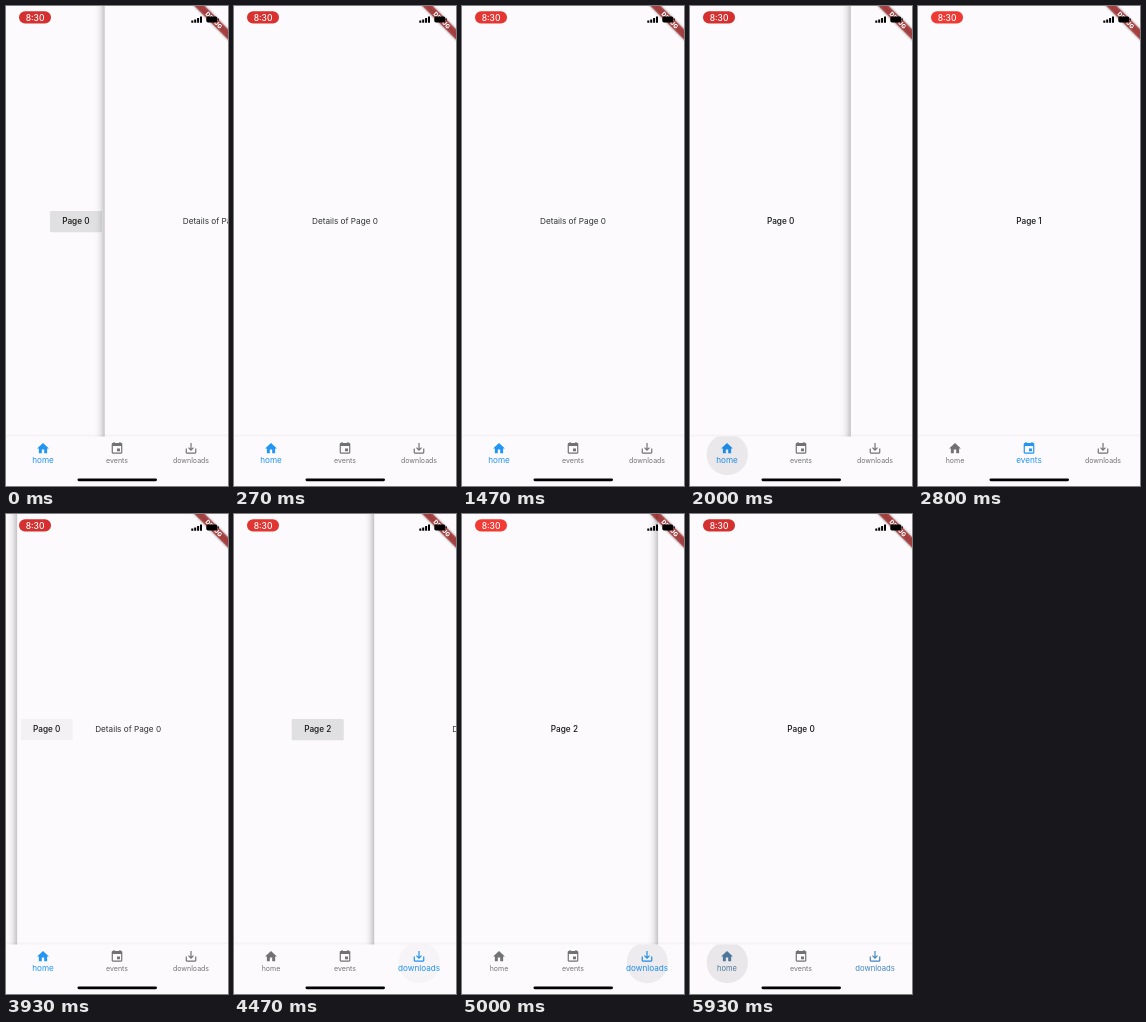
These frames come from a looping animation (222 by 480 pixels, 5990 ms). An HTML page:

```html
<!DOCTYPE html>
<html lang="en">
<head>
<meta charset="utf-8">
<title>Tab navigation</title>
<style>
html, body { margin: 0; width: 100%; height: 100%; overflow: hidden; background: #fcfafd; }
svg { display: block; width: 100%; height: 100%; }
text { font-family: Inter, Roboto, sans-serif; text-anchor: middle; }
.page { font-size: 8.25px; font-weight: 500; fill: #161616; }
.details { font-size: 8.2px; fill: #303030; }
.label { font-size: 7px; }
</style>
</head>
<body>
<svg viewBox="0 0 222 480">
  <defs>
    <linearGradient id="edge">
      <stop offset="0" stop-opacity="0"/>
      <stop offset=".3" stop-opacity=".016"/>
      <stop offset=".6" stop-opacity=".07"/>
      <stop offset="1" stop-opacity=".22"/>
    </linearGradient>
    <linearGradient id="lift" x2="0" y2="1">
      <stop offset="0" stop-opacity="0"/>
      <stop offset="1" stop-opacity=".045"/>
    </linearGradient>
    <clipPath id="barClip"><path d="M0 430.5h222V480H0z"/></clipPath>
    <filter id="blur" x="-20%" y="-100%" width="140%" height="300%"><feGaussianBlur stdDeviation="1.2"/></filter>
  </defs>
  <rect width="222" height="480" fill="#fcfafd"/>

  <g id="root">
    <rect id="press" x="85" y="205" width="52" height="21.3" rx="1.2"/>
    <text id="pageText" class="page" x="111" y="218.3"></text>
  </g>
  <g id="top">
    <rect x="-11" width="11" height="431" fill="url(#edge)"/>
    <text id="detailText" class="details" x="111" y="218.3"></text>
  </g>

  <rect y="427.5" width="222" height="3" fill="url(#lift)"/>
  <rect y="430.5" width="222" height="49.5" fill="#fcfafd"/>
  <g id="bar" clip-path="url(#barClip)"></g>
  <rect x="71.5" y="472.4" width="79.5" height="2.9" rx="1.45"/>

  <g transform="translate(207.8 14.2) rotate(45)">
    <rect x="-26" y="-3.6" width="52" height="7.2" opacity=".5" filter="url(#blur)"/>
    <rect x="-26" y="-3.6" width="52" height="7.2" fill="#b71c1c" fill-opacity=".63"/>
    <text y="2.1" font-size="6" font-weight="800" fill="#fff">DEBUG</text>
  </g>
  <path d="M185.3 14.6h2v2.2h-2zM188.2 13.4h2v3.4h-2zM191.1 12h2v4.8h-2zM194 10.4h2v6.4h-2z"/>
  <rect x="200.3" y="10.4" width="11" height="6" rx="1.7"/>
  <rect x="211.9" y="12.3" width=".9" height="2.2" rx=".4"/>
  <rect id="pill" x="13" y="5.2" width="32" height="12.3" rx="6.1"/>
  <text x="29" y="14.5" font-size="8.5" font-weight="500" fill="#fff">8:30</text>
</svg>
<script>
const LOOP = 5990, SLIDE = 330, W = 222;
const $ = id => document.getElementById(id);
const clamp = v => Math.max(0, Math.min(1, v));
const mix = (a, b, k) => a + (b - a) * k;
const blend = (a, b, k) => `rgb(${a.map((v, i) => Math.round(mix(v, b[i], k)))})`;
const GREY = [114, 114, 116], BLUE = [33, 150, 243];
const DARK_RED = [211, 48, 47], LIGHT_RED = [242, 59, 53];

function bezier(x1, y1, x2, y2) {
  const at = (a, b, s) => 3 * (1 - s) * (1 - s) * s * a + 3 * (1 - s) * s * s * b + s ** 3;
  return x => {
    if (x <= 0 || x >= 1) return clamp(x);
    let lo = 0, hi = 1;
    for (let i = 0; i < 24; i++) {
      const mid = (lo + hi) / 2;
      if (at(x1, x2, mid) < x) lo = mid; else hi = mid;
    }
    return at(y1, y2, lo);
  };
}
const slideEase = bezier(.35, .91, .33, .97);
const tabEase = bezier(.4, 0, .2, 1);

const tabs = [
  { name: 'home', x: 37, icon: 'M10 20v-6h4v6h5v-8h3L12 3 2 12h3v8z' },
  { name: 'events', x: 111, icon: 'M17 12h-5v5h5v-5zM16 1v2H8V1H6v2H5c-1.11 0-1.99.9-1.99 2L3 19c0 1.1.89 2 2 2h14c1.1 0 2-.9 2-2V5c0-1.1-.9-2-2-2h-1V1h-2zm3 18H5V8h14v11z' },
  { name: 'downloads', x: 185, icon: 'M19 12v7H5v-7H3v7c0 1.1.9 2 2 2h14c1.1 0 2-.9 2-2v-7h-2zm-6 .67l2.59-2.58L17 11.5l-5 5-5-5 1.41-1.41L11 12.67V3h2z' }
];

// Tapping the current tab pops its details page.
const taps = [
  { at: 1900, tab: 0 }, { at: 2400, tab: 1 }, { at: 3150, tab: 0 },
  { at: 4200, tab: 2 }, { at: 4855, tab: 2 }, { at: 5870, tab: 0 }
];
const pushes = [-72, 3743, 4420];

function add(parent, tag, attrs) {
  const el = document.createElementNS('http://www.w3.org/2000/svg', tag);
  for (const k in attrs) el.setAttribute(k, attrs[k]);
  return parent.appendChild(el);
}
const set = (el, k, v) => el.setAttribute(k, v);

for (const tab of tabs) {
  const g = tab.group = add($('bar'), 'g', {});
  add(g, 'path', { d: tab.icon, transform: `translate(${tab.x - 7.1} 435.3) scale(.592)` });
  tab.label = add(g, 'text', { class: 'label' });
  tab.label.textContent = tab.name;
  tab.ripple = add($('bar'), 'circle', { cx: tab.x + .3, cy: 448.5, r: 20.7 });
}

function stateAt(t) {
  let tab = 0, prev = 0, switched = -1e4, slide = null;
  const moves = [...taps, ...pushes.map(at => ({ at, push: true }))].sort((a, b) => a.at - b.at);
  for (const m of moves) {
    if (m.at > t) break;
    if (m.push) slide = { at: m.at, open: true };
    else if (m.tab === tab) slide = { at: m.at, open: false };
    else {
      prev = tab;
      tab = m.tab;
      switched = m.at;
      slide = null;
    }
  }
  const k = slide ? slideEase((t - slide.at) / SLIDE) : 0;
  return { tab, prev, switched, depth: slide && !slide.open ? 1 - k : k };
}

function pressAlpha(t) {
  let a = 0;
  for (const at of pushes) {
    const d = t - at;
    if (d > -120 && d < 240) a = .11 * clamp((d + 120) / 60) * clamp((240 - d) / 150);
  }
  return a;
}

function rippleAlpha(t, tab) {
  let a = 0;
  for (const tap of taps) {
    const d = t - tap.at;
    if (tap.tab === tab && d > 0) a = .075 * clamp(d / 20) * clamp((350 - d) / 270);
  }
  return a;
}

function draw(t) {
  const s = stateAt(t);
  const k = tabEase((t - s.switched) / 200);

  $('pageText').textContent = 'Page ' + s.tab;
  $('detailText').textContent = 'Details of Page ' + s.tab;
  set($('root'), 'transform', `translate(${-s.depth * W / 3} 0)`);
  set($('root'), 'visibility', s.depth < 1 ? 'visible' : 'hidden');
  set($('top'), 'transform', `translate(${(1 - s.depth) * W} 0)`);
  set($('top'), 'visibility', s.depth > 0 ? 'visible' : 'hidden');
  set($('press'), 'fill-opacity', pressAlpha(t));

  tabs.forEach((tab, i) => {
    const on = i === s.tab ? k : i === s.prev ? 1 - k : 0;
    set(tab.group, 'fill', blend(GREY, BLUE, on));
    set(tab.label, 'transform', `translate(${tab.x} 457.4) scale(${mix(1, 14 / 12, on)})`);
    set(tab.ripple, 'fill-opacity', rippleAlpha(t, i));
  });

  set($('pill'), 'fill', blend(DARK_RED, LIGHT_RED, .5 - .5 * Math.cos(t * Math.PI / 1000)));
}

function stepTime(t) {
  const r = t % 200;
  return (Math.floor(t / 200) * 3 + (r >= 130 ? 2 : r >= 70 ? 1 : 0)) * 200 / 3;
}

const start = performance.now();
function tick() {
  draw(stepTime((performance.now() - start) % LOOP));
  requestAnimationFrame(tick);
}
tick();
</script>
</body>
</html>
```
